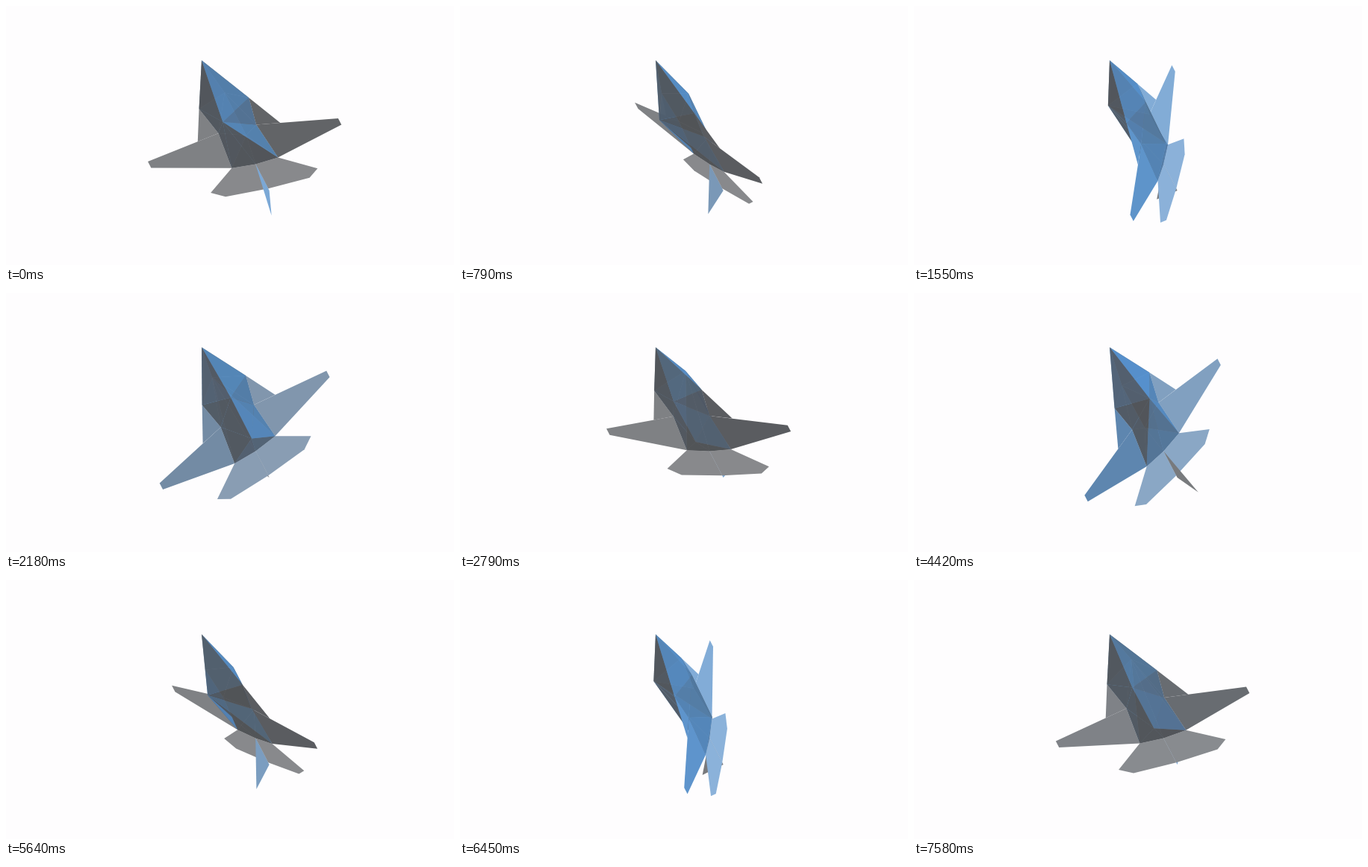
Animation of 600 by 348 pixels, one loop 7.61 s. Source, as an HTML page with a canvas:

```html
<!DOCTYPE html>
<html lang="en">
<head>
<meta charset="utf-8">
<title>Rolling jet</title>
<style>
html, body { margin: 0; width: 100%; height: 100%; overflow: hidden; background: #fefdfe; }
canvas { display: block; }
</style>
</head>
<body>
<canvas id="stage" width="600" height="348"></canvas>
<script>
const ctx = document.getElementById('stage').getContext('2d');
const LOOP = 7610;

// Roll angle in degrees at given times
const ROLL = [[0, 21.5], [790, 68], [1550, 121.4], [2790, 216.8], [4420, 333],
  [5640, 420.4], [6450, 476.5], [7580, 557], [LOOP, 559]];

// Axis direction on screen, its foreshortening, and its lean in depth
const AX = 0.46, AY = 0.888, SHORT = 0.753, LEAN = 0.658;
const LIGHT = [0.8, 0.28, -0.53];
const VIEW = [0, SHORT, -LEAN];

// Points: [sideways, distance from the nose, height]
const nose = [0, 0, 0], apex = [0, 65, 35], keel = [0, 65, -20], belly = [0, 128, -18];
const stern = [0, 157, 0];
const faces = [];
const add = (kind, side, ...points) => {
  const level = Math.sign(points.reduce((sum, p) => sum + p[2], 0));
  faces.push({ kind, side, points, level });
};

for (const s of [1, -1]) {
  const at = (r, d) => [s * r, d, 0];
  const mid = at(35.6, 65), root = at(27, 104), rear = at(33, 155);
  add('body', s, nose, mid, apex);
  add('body', s, mid, root, apex);
  add('body', s, root, rear, apex);
  add('body', s, rear, stern, apex);
  add('body', s, nose, mid, keel);
  add('body', s, mid, root, keel);
  add('body', s, root, belly, keel);
  add('body', s, root, rear, belly);
  add('body', s, rear, stern, belly);
  add('wing', s, mid, at(59, 108.8), root);
  add('wing', s, root, at(136, 120.5), at(136, 130), rear);
  add('tail', s, rear, at(76.4, 182), at(60, 192), at(0, 194), stern);
}
add('fin', 0, stern, [0, 207, 35], [0, 197, 0]);

const dot = (a, b) => a[0] * b[0] + a[1] * b[1] + a[2] * b[2];
const sub = (a, b) => a.map((v, i) => v - b[i]);
const cross = (a, b) => [a[1] * b[2] - a[2] * b[1], a[2] * b[0] - a[0] * b[2], a[0] * b[1] - a[1] * b[0]];

function rollAt(t) {
  const i = ROLL.findIndex(k => k[0] > t);
  const [t0, a] = ROLL[i - 1], [t1, b] = ROLL[i];
  return (a + (b - a) * (t - t0) / (t1 - t0)) * Math.PI / 180;
}

function project([u, v, s]) {
  const along = s * SHORT + v * LEAN;
  return [262 + AX * along + AY * u, 73 + AY * along - AX * u];
}

function shade(p) {
  const n = cross(sub(p[1], p[0]), sub(p[2], p[0]));
  const size = Math.hypot(...n) * (dot(n, VIEW) < 0 ? -1 : 1);
  const lit = Math.max(0, dot(n, LIGHT) / size);
  return [78 + 5 * lit, 80 + 72 * lit, 84 + 138 * lit];
}

// Thin parts are paled towards white but hide what lies behind them
function paint(kind, p, nearness) {
  const color = shade(p);
  if (kind === 'body') return `rgba(${color.map(Math.round)},0.85)`;
  const density = { tail: 0.67, fin: 0.76, wing: Math.min(0.93, 0.72 + 0.45 * Math.max(0, nearness)) }[kind];
  return `rgb(${color.map(v => Math.round(254 + (v - 254) * density))})`;
}

function draw(t) {
  const roll = rollAt(t), c = Math.cos(roll), s = Math.sin(roll);
  const turn = ([r, d, h]) => [r * c - h * s, r * s + h * c, d / SHORT];
  const scene = faces.map(({ kind, side, points, level }) => {
    const p = points.map(turn);
    const depth = p.reduce((sum, q) => sum + dot(q, VIEW), 0) / p.length;
    return { p, depth, kind, layer: level * Math.sign(c), near: side * s };
  }).sort((a, b) => a.layer - b.layer || a.depth - b.depth);

  ctx.fillStyle = '#fefdfe';
  ctx.fillRect(0, 0, 600, 348);
  for (const { p, kind, near } of scene) {
    ctx.fillStyle = paint(kind, p, near);
    ctx.beginPath();
    p.forEach(q => ctx.lineTo(...project(q)));
    ctx.fill();
  }
}

function tick() {
  draw(performance.now() % LOOP);
  requestAnimationFrame(tick);
}
tick();
</script>
</body>
</html>
```
